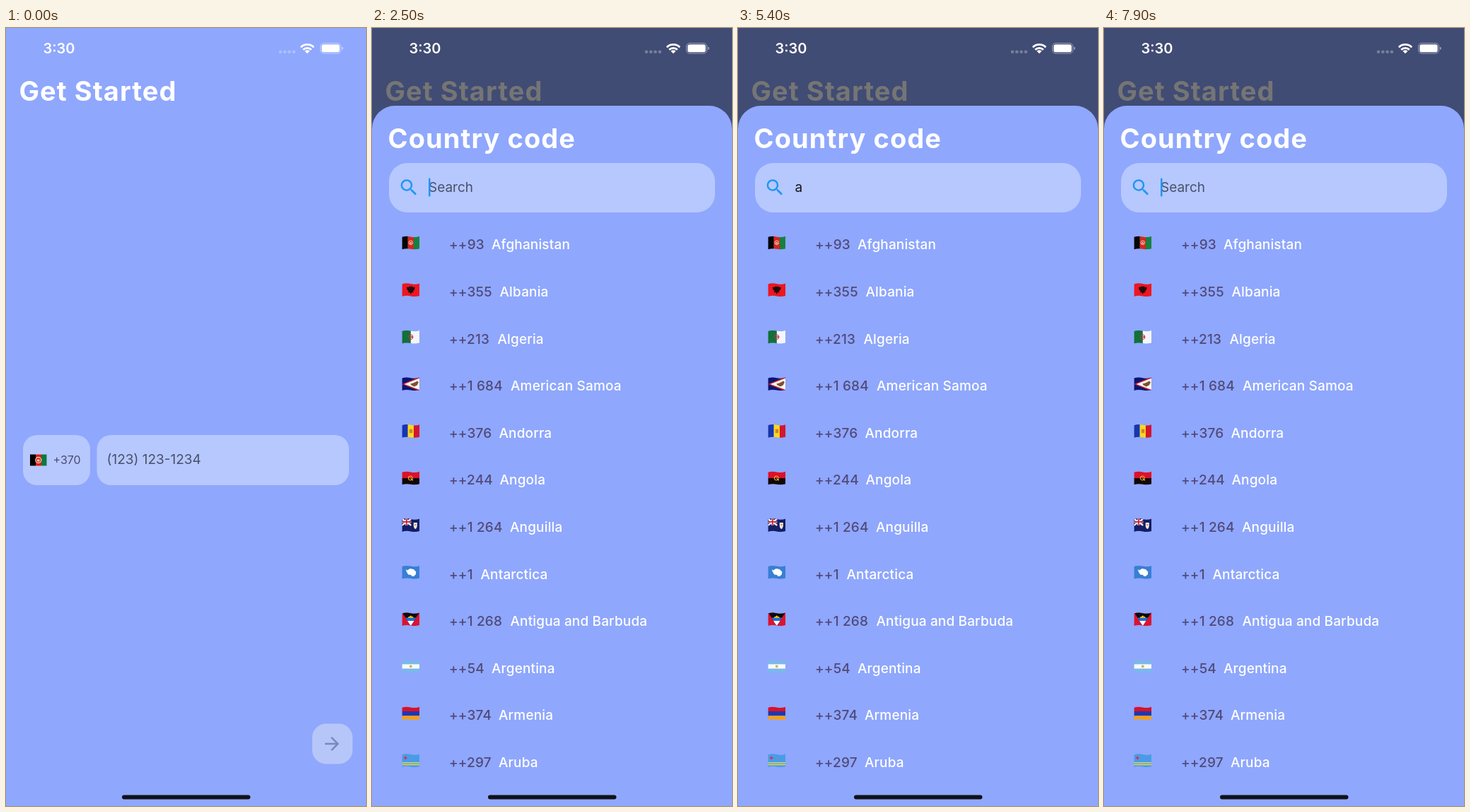
An HTML page for the animation above (8000 ms loop, 509 px wide and 1101 px high).

```html
<!DOCTYPE html>
<html lang="en">
<head>
<meta charset="utf-8">
<title>Country code picker</title>
<style>
html, body { margin: 0; width: 100%; height: 100%; overflow: hidden; background: #8fa7fd; }
svg { display: block; width: 100%; height: 100%; font-family: Inter, Roboto, sans-serif; }
text { white-space: pre; }
.h1 { font-size: 38px; font-weight: 700; letter-spacing: 1.05px; fill: #fff; }
.row { font-size: 19px; font-weight: 500; letter-spacing: .15px; fill: #fff; }
.code { fill: #514a7a; }
.input { font-size: 19px; fill: #49506c; }
.box { fill: #b6c8fd; }
</style>
</head>
<body>
<svg viewBox="0 0 509 1101">
  <defs>
    <clipPath id="wave"><path d="M0 1Q6-1 12.500 .6T25 0V17.500Q19 19.300 12.500 18T0 18.500Z"/></clipPath>
  </defs>
  <rect width="509" height="1101" fill="#8fa7fd"/>

  <text class="h1" x="18.500" y="102.500">Get Started</text>
  <rect class="box" x="24" y="576" width="95" height="71" rx="20"/>
  <rect class="box" x="128.500" y="576" width="356.500" height="71" rx="20"/>
  <g transform="translate(34 603.500)">
    <path d="M0 0H8V16H0z"/>
    <path d="M8 0H16V16H8z" fill="#d8200f"/>
    <path d="M16 0H23.500V16H16z" fill="#0b7a3c"/>
    <circle cx="11.800" cy="8" r="4" fill="none" stroke="#f3c6c0" stroke-width="1.300"/>
    <path d="M10 7h3.600v3H10z" fill="#f3c6c0"/>
  </g>
  <text x="66.500" y="617" font-size="16" fill="#4b4a78">+370</text>
  <text class="input" x="142.500" y="617">(123) 123-1234</text>
  <rect x="433" y="984.500" width="57" height="57" rx="19.500" fill="#b7c6f9"/>
  <path transform="translate(446 998) scale(1.25)" fill="#7a87bd"
    d="M12 4l-1.410 1.410L16.170 11H4v2h12.170l-5.580 5.590L12 20l8-8z"/>

  <rect id="dim" width="509" height="1101"/>
  <g id="sheet">
    <path d="M0 1101V142.500A32.500 32.500 0 0 1 32.500 110H476.500A32.500 32.500 0 0 1 509 142.500V1101Z" fill="#8fa7fd"/>
    <text class="h1" x="22.500" y="170">Country code</text>
    <rect class="box" x="24" y="191" width="461" height="70" rx="26"/>
    <path id="lens" transform="translate(36.800 210.300) scale(1.28)"
      d="M15.500 14h-.79l-.28-.27A6.471 6.471 0 0016 9.500 6.500 6.500 0 109.500 16c1.610 0 3.090-.59 4.230-1.570l.27.28v.79l5 4.990L20.490 19l-4.990-5zm-6 0C7.010 14 5 11.990 5 9.500S7.010 5 9.500 5 14 7.010 14 9.500 11.990 14 9.500 14z"/>
    <text id="hint" class="input" x="80" y="232">Search</text>
    <text id="typed" class="input" x="80.500" y="232" style="fill:#14161c"></text>
    <rect id="cursor" y="212.500" width="2.500" height="26" rx="1.200" fill="#2196f3"/>
    <g id="all"></g>
    <g id="matches"></g>
  </g>

  <g fill="#fff">
    <text x="52.500" y="36" font-size="20" font-weight="600">3:30</text>
    <g opacity=".28">
      <circle cx="388" cy="33.700" r="2.300"/><circle cx="394.300" cy="33.700" r="2.300"/>
      <circle cx="400.600" cy="33.700" r="2.300"/><circle cx="406.900" cy="33.700" r="2.300"/>
    </g>
    <path d="M426 36.300l-3.500-3.500a5 5 0 0 1 7 0z"/>
    <g fill="none" stroke="#fff" stroke-width="2.700">
      <path d="M416.800 27.200a13.200 13.200 0 0 1 18.400 0"/>
      <path d="M420.200 30.800a8.300 8.300 0 0 1 11.600 0"/>
    </g>
    <rect x="444.500" y="21.500" width="29" height="14.500" rx="4.500" fill="none" stroke="#fff" stroke-opacity=".45"/>
    <rect x="446.300" y="23.300" width="25.400" height="10.900" rx="2.800"/>
    <path d="M475 26.300q1.800.6 1.800 2.400t-1.800 2.400z" opacity=".5"/>
  </g>
  <rect x="164" y="1085.500" width="181.500" height="6" rx="3" fill="#111217"/>
</svg>
<script>
const $ = id => document.getElementById(id);
const rect = (x, y, w, h, c) => `<rect x="${x}" y="${y}" width="${w}" height="${h}" fill="${c}"/>`;
const path = (d, c) => `<path d="${d}" fill="${c}"/>`;
const dot = (x, y, r, c) => `<circle cx="${x}" cy="${y}" r="${r}" fill="${c}"/>`;
const ring = (x, y, r, c) => `<circle cx="${x}" cy="${y}" r="${r}" fill="none" stroke="${c}"/>`;
const fill = c => rect(0, -1, 25, 21, c);
const cols = (...cs) => cs.map((c, i) => rect(i * 25 / cs.length, -1, 25 / cs.length + .2, 21, c)).join('');
const rows = (...cs) => cs.map((c, i) => rect(0, i * 18.500 / cs.length - (i ? 0 : 1), 25, 20 / cs.length + 1, c)).join('');
const jack = rect(0, -1, 13, 10.500, '#1d2a6b') +
  '<path d="M0 0L13 9.500M13 0L0 9.500" stroke="#fff" stroke-width="2"/>' +
  '<path d="M6.500-1V9.500M0 4.500H13" stroke="#fff" stroke-width="3"/>' +
  '<path d="M6.500-1V9.500M0 4.500H13" stroke="#d0162b" stroke-width="1.600"/>';

// code, name, x of name, flag
const countries = [
  ['93', 'Afghanistan', 169, cols('#050505', '#d2281c', '#17803f') + ring(12.500, 9, 2.800, '#f0c9b8') + dot(12.500, 9.500, 1.300, '#f0c9b8')],
  ['355', 'Albania', 180.500, fill('#ee1620') + path('M12.500 5l1.500-1.500 1 1.500 3.500.5-1 4-2 1 1 2.500-2.500-.5-1.500 3-1.500-3-2.500.5 1-2.500-2-1-1-4 3.500-.5 1-1.500z', '#24090b')],
  ['213', 'Algeria', 177.500, cols('#12703a', '#f4f6f8') + ring(12.500, 9.300, 3.200, '#d9293f') + dot(14.200, 9.300, 1.300, '#d9293f')],
  ['1 684', 'American Samoa', 196, fill('#0b1470') + path('M25-1L0 9.300 25 19.500z', '#c8202f') + path('M25 1L3.500 9.300 25 17.500z', '#f6f6f6') + path('M12 9l4-1 6-3 1.500 2-2 4-4 2-4-2z', '#7d5427')],
  ['376', 'Andorra', 179.500, cols('#1735b0', '#fbd81f', '#d3152f') + rect(10.500, 6.500, 4.500, 5.500, '#c48a35')],
  ['244', 'Angola', 180.500, rows('#dc1128', '#120607') + ring(12, 9.200, 3, '#eccb2d') + path('M10 7l6 5-1 1z', '#eccb2d')],
  ['1 264', 'Anguilla', 195, fill('#151d66') + jack + path('M16.500 5.500h5v5q-.5 3-2.500 4-2-1-2.500-4z', '#f1efe6') + dot(19, 8.700, 1.400, '#e79a3c')],
  ['1', 'Antarctica', 153.500, fill('#377fd4') + path('M5.500 5l2 1.500 4-2.500 5 1 3.500 3.500-.5 4-3 2.500-3-.5-.5-1.500-4-.5-2.500-4z', '#fff')],
  ['1 268', 'Antigua and Barbuda', 195.500, fill('#dc1330') + path('M0-1H25L12.500 18.500z', '#0a0a0c') + path('M5 7H20L12.500 18.500z', '#1f6fd2') + path('M7.800 11.500H17.200L12.500 18.500z', '#fff') + path('M8.500 7.200l1-2 1.200.5 1.800-2 1.800 2 1.200-.5 1 2z', '#f9cf28')],
  ['54', 'Argentina', 169, rows('#7ab8ec', '#f8fafc', '#7ab8ec') + dot(12.500, 9.200, 1.900, '#dfad48')],
  ['374', 'Armenia', 179, rows('#dc1028', '#1c38b4', '#f2a01c')],
  ['297', 'Aruba', 179, fill('#4b9be6') + rect(0, 11.800, 25, 1.300, '#f6dd3c') + rect(0, 14.500, 25, 1.300, '#f6dd3c') + path('M5 2.500l.9 2.100 2.100.9-2.100.9-.9 2.100-.9-2.100L2 5.500l2.100-.9z', '#e02a3c')]
];
const found = [
  ['45', 'Denmark', 168.500], ['253', 'Djibouti', 180], ['1 767', 'Dominica', 192.500]
];

const STEP = 66.600;
const label = (code, name, x, y) =>
  `<text class="row code" x="109" y="${y}">++${code}</text><text class="row" x="${x}" y="${y}">${name}</text>`;
const item = ([code, name, x, flag], i) => label(code, name, x, 313.400 + i * STEP) +
  (flag ? `<g transform="translate(42.300 ${294.800 + i * STEP})"><g clip-path="url(#wave)">${flag}</g></g>` : '');
$('all').innerHTML = countries.map(item).join('');
$('matches').innerHTML = found.map(item).join('') +
  label('1 809, +1 829, +1 849', 'Dominican', 343.500, 501.500) +
  '<text class="row" x="108.500" y="524.500">Republic</text>';

const LOOP = 8000, FOCUS = 2500;
// moments that restart the cursor blink, with the text in the field
const keys = [[FOCUS, ''], [3205, 'd'], [4205, ''], [4405, 'a'], [4590, 'a'], [6605, '']];
const caretX = { '': 80, d: 91.700, a: 90.500 };
const ramp = (t, from, ms) => Math.min(1, Math.max(0, (t - from) / ms));

function blink(age) {
  const a = age % 1000;
  return 1 - ramp(a, 500, 150) + ramp(a, 850, 150);
}

function draw(t) {
  const open = ramp(t, 400, 200);
  $('dim').setAttribute('opacity', .54 * open);
  $('sheet').setAttribute('transform', `translate(0 ${991 * (1 - open) ** 3})`);

  const focused = t >= FOCUS;
  const [since, text] = keys.filter(k => k[0] <= t).pop() || keys[0];
  $('lens').setAttribute('fill', focused ? '#2196f3' : '#63709c');
  $('typed').textContent = text;
  const fade = at => ramp(t, at, 150);
  $('hint').setAttribute('opacity', 1 - fade(3205) + fade(4205) - fade(4405) + fade(6605));
  $('cursor').setAttribute('x', caretX[text]);
  $('cursor').setAttribute('opacity', focused ? blink(t - since) : 0);
  $('all').setAttribute('display', text === 'd' ? 'none' : 'inline');
  $('matches').setAttribute('display', text === 'd' ? 'inline' : 'none');
}

const start = performance.now();
function tick() {
  draw(Math.floor((performance.now() - start) % LOOP / 100) * 100);
  requestAnimationFrame(tick);
}
tick();
</script>
</body>
</html>
```
